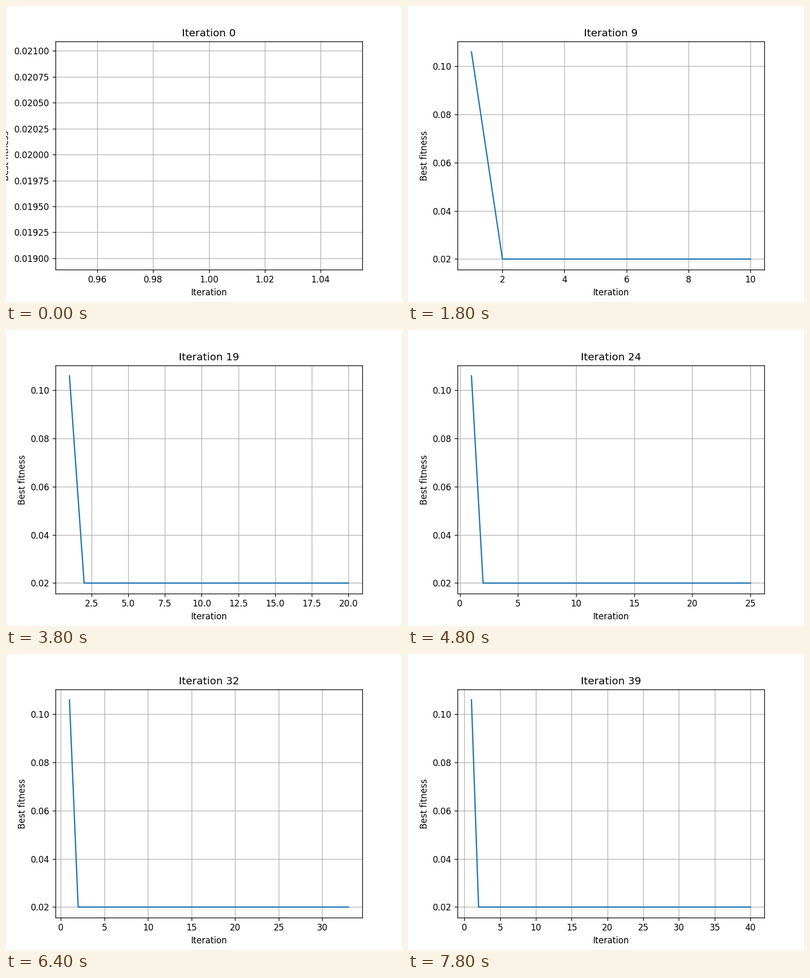
Recreate the animation shown at these times as a matplotlib script. Size 768 px wide and 576 px high, loop 8 s.

```python
import numpy as np
import matplotlib.pyplot as plt
from matplotlib.animation import FuncAnimation

FRAMES, INTERVAL = 40, 200
START, BEST = 0.10602, 0.0199912

fig, ax = plt.subplots(figsize=(6.4, 4.8), dpi=120)


def history(i):
    """Best fitness after each iteration up to number i."""
    fitness = np.full(i + 1, BEST)
    if i > 0:
        fitness[0] = START
    return np.arange(1, i + 2), fitness


def update(i):
    ax.clear()
    ax.plot(*history(i), color="#1f77b4", linewidth=1.5)
    ax.set_title(f"Iteration {i}")
    ax.set_xlabel("Iteration")
    ax.set_ylabel("Best fitness")
    ax.grid(True)
    return ax.lines


anim = FuncAnimation(fig, update, frames=FRAMES, interval=INTERVAL,
                     init_func=lambda: update(0), repeat=True, repeat_delay=0)
plt.show()
```
